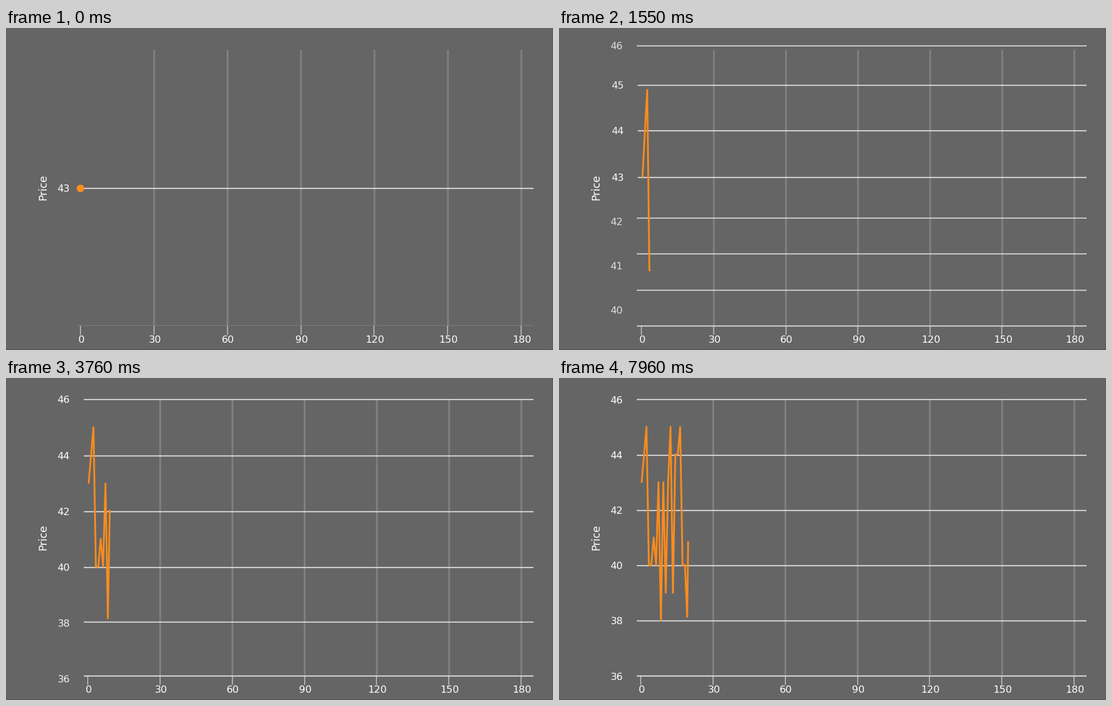
A matplotlib script that plays this animation: 900x531 px, repeating every 8000 ms.

```python
import numpy as np
import matplotlib.pyplot as plt
from matplotlib.animation import FuncAnimation

W, H, DPI = 900, 531, 90
PX = 72 / DPI
LOOP, TICK = 8000, 20
TOP, BOTTOM, RIGHT, LAST_X = 35, 491, 868, 847.5
BG, ORANGE = "#656565", "#f98c1e"

PRICES = [43, 44, 45, 40, 40, 41, 40, 43, 38, 43, 39,
          43, 45, 39, 44, 44, 45, 40, 40, 38, 45]
MINUTES = range(0, 181, 30)

# a new price arrives at a steady pace and interrupts the running transition
FIRST, PACE = 226, 395.8
# the screen refreshes less often than the clock ticks
REFRESH, PHASE = 78.2, 16.6


class PriceAxis:
    """Round limits and step for the prices; wider labels push the plot right."""

    def __init__(self, prices):
        low, high = min(prices), max(prices)
        pad = 0.05 * (high - low)
        if pad:
            low, high = low - pad, high + pad
            step = next(s for s in (0.25, 0.5, 1, 2) if s >= (high - low) / 6)
            self.low = np.floor(low / step) * step
            self.high = np.ceil(high / step) * step
            self.ticks = np.arange(self.low, self.high + step / 2, step)
        else:
            self.low, self.high = low - 0.477, high + 0.48
            self.ticks = np.array([low])
        decimals = max(len(f"{v:g}") for v in self.ticks) - 3
        self.left = 128 + (6 + 10 * decimals if decimals > 0 else 0)
        self.x0 = self.left + 6.5

    def y(self, v):
        return BOTTOM - (v - self.low) * (BOTTOM - TOP) / (self.high - self.low)

    def points(self, n):
        x = self.x0 + 1.5
        return np.column_stack([x + np.arange(n) * (LAST_X + 1 - x) / 180,
                                self.y(np.array(PRICES[:n]))])


AXES = [PriceAxis(PRICES[:n]) for n in range(1, len(PRICES) + 1)]


def mix(a, b, p):
    return a + (b - a) * p


def swing(t):
    return 0.5 - 0.5 * np.cos(np.pi * np.clip(t, 0, 1))


def move_ticks(ticks, old, new, p):
    """A tick holds line y, label y, left end, line alpha and label alpha."""
    out = {}
    for v in {*old.ticks, *new.ticks}:
        start = old.y(v)
        a = ticks.get(v, np.array([min(start, BOTTOM), start, new.left, 0, 0]))
        alive = float(v in new.ticks)
        now = mix(a, np.array([new.y(v), new.y(v), new.left, alive, alive]), p)
        if alive:
            now[4] = mix(a[4], 1, max(0, 2 * p - 1))
        out[v] = now
    return out


def state(t):
    axis = AXES[0]
    x0 = 122.5
    pts = np.array([[122, axis.y(PRICES[0])]])
    ticks = {v: np.array([axis.y(v), axis.y(v), axis.left, 1, 1])
             for v in axis.ticks}
    for k in range(1, len(PRICES)):
        elapsed = t - FIRST - PACE * (k - 1)
        if elapsed < 0:
            break
        # the chart is slower while it is still warming up
        p = swing(min(elapsed, PACE) / (610 if k < 3 else 500))
        old, axis = axis, AXES[k]
        ticks = move_ticks(ticks, old, axis, p)
        x0 = mix(x0, axis.x0, p)
        pts = mix(np.vstack([pts, pts[-1]]), axis.points(k + 1), p)
    return pts, ticks, x0


fig = plt.figure(figsize=(W / DPI, H / DPI + 1e-6), dpi=DPI, facecolor=BG)
ax = fig.add_axes([0, 0, 1, 1])
ax.set_xlim(0, W)
ax.set_ylim(H, 0)
ax.axis("off")


def stroke(color, width, z, cap="butt"):
    return ax.plot([], [], color=color, lw=width * PX, zorder=z, snap=False,
                   solid_capstyle=cap, solid_joinstyle="round")[0]


def label(size=16.4, **kw):
    return ax.text(0, 0, "", color="white", fontsize=size * PX,
                   family="DejaVu Sans", va="baseline", zorder=5, **kw)


stroke("#505050", 1, 0).set_data([0, W], [530.5, 530.5])
stroke("#5a5a5a", 1, 0).set_data([899.5, 899.5], [0, H])

columns = [stroke("#808080", 3, 1) for _ in MINUTES]
marks = [stroke("#c0d0e0", 1.4, 2) for _ in MINUTES]
numbers = [label(ha="center") for _ in MINUTES]
base = stroke("#7c7c7c", 1, 1)
rows = [stroke("#f0f0f0", 1.6, 2) for _ in range(18)]
row_labels = [label(ha="right") for _ in rows]
title = label(17.4, ha="center", rotation=90, rotation_mode="anchor")
title.set_text("Price")
curve = stroke(ORANGE, 2.9, 6, cap="round")
dot, = ax.plot([], [], "o", color=ORANGE, ms=12.5 * PX, mew=0, zorder=7)


def draw_minutes(x0):
    for m, column, mark, number in zip(MINUTES, columns, marks, numbers):
        x = x0 + m * (LAST_X - x0) / 180
        if m:
            column.set_data([x + 0.4] * 2, [36, BOTTOM])
        mark.set_data([np.floor(x) + 0.5] * 2, [BOTTOM, 506])
        number.set_text(str(m))
        number.set_position((x + 1.5, 519))
    base.set_data([x0 - 6, RIGHT], [490.5, 490.5])


def draw_prices(ticks):
    for artist in rows + row_labels:
        artist.set_visible(False)
    for v, row, text in zip(sorted(ticks), rows, row_labels):
        y, label_y, left, alpha, label_alpha = ticks[v]
        y = np.ceil(y) + 0.5
        row.set_data([left, RIGHT], [y, y])
        row.set_alpha(np.clip(alpha, 0, 1))
        row.set_visible(True)
        text.set_text(f"{v:g}")
        text.set_position((left - 23, label_y + 6.5))
        text.set_alpha(np.clip(label_alpha, 0, 1))
        text.set_visible(-20 < label_y < H + 20)


def draw(i):
    now = i * TICK + TICK - 1
    t = max(0, (now + PHASE) // REFRESH * REFRESH - PHASE)
    pts, ticks, x0 = state(t)
    draw_minutes(x0)
    draw_prices(ticks)
    shifted = ticks[PRICES[0]][2] > 132 if PRICES[0] in ticks else False
    title.set_position((65 if shifted else 66, 262.5))
    curve.set_data(pts[:, 0], pts[:, 1])
    dot.set_data(pts[:1, 0], pts[:1, 1])
    dot.set_visible(len(pts) == 1)
    return []


anim = FuncAnimation(fig, draw, frames=LOOP // TICK, interval=TICK,
                     init_func=lambda: [], repeat=True, repeat_delay=0, blit=False)
plt.show()
```
